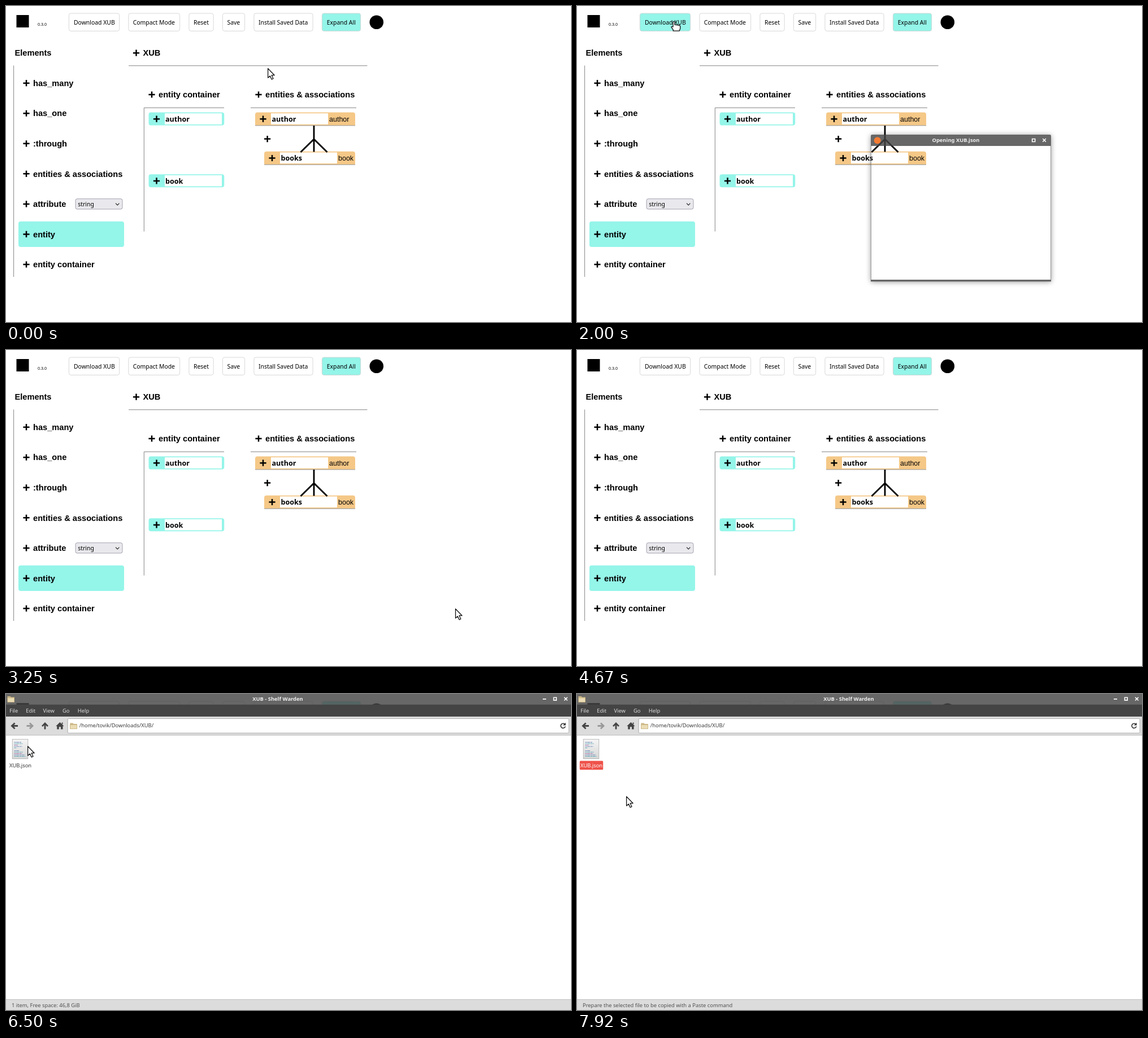
An HTML page for the animation above (8000 ms loop, 1000x560 px).

```html
<!DOCTYPE html>
<html lang="en">
<head>
<meta charset="utf-8">
<title>Entity editor</title>
<style>
html, body { margin: 0; width: 100%; height: 100%; overflow: hidden; background: #fff; }
svg { position: absolute; left: 0; top: 0; width: 1000px; height: 560px; }
text { white-space: pre; }
.head { font: bold 14.625px "Liberation Sans", sans-serif; }
.label { font: 12.5px "Liberation Sans", sans-serif; }
.field { font: bold 12.5px "Noto Sans", sans-serif; }
.ui { font: 10.42px "Noto Sans", sans-serif; }
.tiny { font: 7.1px "Noto Sans", sans-serif; }
.sys { font: 9.375px "Noto Sans", sans-serif; }
.title { font: bold 9.375px "Noto Sans", sans-serif; fill: #f0f0f0; text-anchor: middle; }
.shadow { position: absolute; left: 520px; top: 228px; width: 319px; height: 260px; box-shadow: 0 1px 9px rgba(0,0,0,.4); }
</style>
</head>
<body>
<svg id="page"></svg>
<div id="dialog"><div class="shadow"></div><svg id="dialogArt"></svg></div>
<svg id="files"></svg>
<svg id="pointer"></svg>
<script>
const $ = id => document.getElementById(id);
const AQUA = '#94f5e9', SAND = '#f5c887', RED = '#ee524a', GLASS = 'rgba(70,70,70,.82)';

const text = (x, y, s, cls, more = '') => `<text x="${x}" y="${y}" class="${cls}" ${more}>${s}</text>`;
const rect = (x, y, w, h, fill, more = '') => `<rect x="${x}" y="${y}" width="${w}" height="${h}" fill="${fill}" ${more}/>`;
const line = (d, color = '#000', w = 1, more = '') => `<path d="${d}" fill="none" stroke="${color}" stroke-width="${w}" ${more}/>`;
const shape = (d, fill, more = '') => `<path d="${d}" fill="${fill}" ${more}/>`;
const dot = (x, y, r, fill) => `<circle cx="${x}" cy="${y}" r="${r}" fill="${fill}"/>`;
const plus = (x, y) => line(`M${x - 5.6} ${y}h11.2M${x} ${y - 5.6}v11.2`, '#000', 2.5);
const heading = (x, y, s) => plus(x, y) + text(x + 12, y + 5.2, s, 'head');

// Editor page
const button = ([x, w, s, tx, on], i) =>
  rect(x + .4, 13, w - .8, 31.4, on ? AQUA : '#fff', `id="button${i}" rx="3.5" stroke="#cfcfcf" stroke-width=".8"`) +
  text(tx, 32.8, s, 'ui');

const entity = (y, s) =>
  rect(252.5, y, 133.7, 23, AQUA, 'rx="4"') + rect(281, y + 1.7, 101, 19.6, '#fff') +
  plus(266.5, y + 11.7) + text(282, y + 16.4, s, 'field');

const association = (x, y, s, type) =>
  shape(`M${x} ${y + 23.3}v-19.3q0 -4 4 -4H614q4 0 4 4v19.3z`, SAND) +
  rect(x + 28, y + 1.7, 101, 19.6, '#fff') + line(`M${x} ${y + 23.4}H618`, '#888', .9) +
  plus(x + 14, y + 11.7) + text(x + 29.5, y + 16.4, s, 'field') + text(x + 131, y + 16, type, 'label');

const elements = ['has_many', 'has_one', ':through', 'entities &amp; associations', 'attribute', 'entity', 'entity container'];
const buttons = [
  [111, 90, 'Download XUB', 120], [216.5, 91.5, 'Compact Mode', 224.7], [323.5, 44, 'Reset', 332],
  [383, 40, 'Save', 391.5], [438.5, 105, 'Install Saved Data', 447], [559, 69, 'Expand All', 567.8, true]
];

$('page').innerHTML =
  rect(18.5, 16, 22, 22, '#000') + text(56, 35, '0.3.0', 'tiny') +
  buttons.map(button).join('') + dot(655.8, 28.8, 12.3, '#000') +
  text(15.5, 88.4, 'Elements', 'head') + line('M13.6 105.5V480', '#777', .9) +
  rect(22, 381.7, 187, 45.3, AQUA, 'rx="4"') +
  elements.map((s, i) => heading(36, 136.7 + i * 53.55, s)).join('') +
  rect(123, 341.7, 83, 18.3, '#e9e9ed', 'rx="3" stroke="#8f8f9d" stroke-width=".8"') +
  text(127.3, 355, 'string', 'ui') + line('M194 349.6l3.2 3.2 3.2 -3.2', '#222', 1.2) +
  heading(230.5, 83.2, 'XUB') + line('M217 105.8H639.5', '#777', .9) +
  heading(258, 157, 'entity container') + line('M386 180.4H244.3V399.5', '#777', .9) +
  heading(447, 157, 'entities &amp; associations') + line('M433 180.4H620', '#777', .9) +
  entity(188.5, 'author') + entity(298.2, 'book') +
  association(441, 188.5, 'author', 'author') + association(457, 257.8, 'books', 'book') +
  plus(462.6, 235.6) + line('M545 212V258.5M521.5 259L545 236L568.5 259', '#000', 2.8);

// Save dialog
$('dialogArt').innerHTML =
  shape('M520 248v-18q0 -2 2 -2H837q2 0 2 2v18z', GLASS) +
  line('M520.4 248V488M838.6 248V488', '#777', .8) + rect(520, 485, 319, 3.3, '#666') +
  dot(531.7, 238.2, 6, '#f47b32') + text(670.5, 241.4, 'Opening XUB.json', 'title') +
  line('M805.7 235.5h5v5h-5z', '#fff', 1.6) + line('M824.3 235l5.6 5.6m0 -5.6l-5.6 5.6', '#fff', 1.5);

// File window
const folder = (x, y) =>
  shape(`M${x} ${y + 11}v-10.5h5l1.5 1.5h6v9z`, '#cdb887') +
  rect(x + .4, y + 3.4, 11.8, 7.4, '#eadcb4', 'stroke="#bfa975" stroke-width=".6"');
const arrow = (x, y, turn, color) =>
  line('M6 0H-4M.6 -5L-4.6 0L.6 5', color, 2.8, `transform="translate(${x} ${y}) rotate(${turn})"`);

const inkLines = Array.from({ length: 11 }, (_, i) =>
  line(`M14.5 ${85.5 + i * 2.5}h${[13, 15, 6, 14, 4, 0, 9, 15, 14, 19, 20][i]}`,
    ['#7188b8', '#58a6b5', '#a870a8'][i % 3], 1, 'stroke-dasharray="3 .6 5 .8"')).join('');

const rows = [
  ['Open With "Inkvosel"', 102], ['Open With', 121.7], ['Send To', 143.6], ['Cut', 165.4], ['Copy', 185],
  ['Move to Trash', 207], ['Rename...', 228.8], ['Open Terminal Here', 250.7], ['Create Archive...', 270.4], ['Properties...', 292.2]
];
const rowIcons =
  rect(42.5, 97, 9.5, 10.5, '#e8e8e8') + line('M45 105l7.5 -7.5', '#555', 2) +
  line('M44 160l6 9M51 160l-6 9', '#d8d8d8', 1.4) + line('M43.5 170l3 -4M51.5 170l-3 -4', '#e03c3c', 2) +
  rect(42.5, 179.5, 7, 9, '#eee') + rect(45.5, 182, 7, 8.5, '#fff') + line('M47 186h3.5l-2 -2m2 2l-2 2', '#54a845', 1.2) +
  shape('M43.3 204h8.6l-.9 8.5h-6.8z', '#d5d5d5') + line('M42.5 202.6h10.2M46 201h3.2', '#e8e8e8', 1.5) +
  line('M46 205v6M49.2 205v6', '#888', .8) +
  rect(42.4, 245.7, 10.4, 9.8, '#222', 'stroke="#aaa" stroke-width=".8"') + line('M44.4 248l1.7 1.5 -1.7 1.5M47 251.5h2.6', '#fff', .9) +
  rect(43.5, 265, 9, 5, '#f1b93c') + rect(42, 269.5, 10.5, 5.5, '#f7d66d') + line('M43 269h9', '#b86b28', 1) +
  `<circle cx="47.6" cy="292" r="4.9" fill="none" stroke="#ccc" stroke-width="2" stroke-dasharray="2 1.85"/>` +
  `<circle cx="47.6" cy="292" r="3" fill="none" stroke="#ddd" stroke-width="2.6"/>`;

const menu =
  rect(38, 92.5, 141, 209.5, '#444', 'stroke="#353535" stroke-width=".8"') +
  [132.6, 154.4, 196, 217.9, 239.7, 281.3].map(y => line(`M39 ${y}H178.5`, '#3a3a3a', .8)).join('') +
  rect(38.4, 0, 140.4, 19.6, RED, 'id="hover"') + rowIcons +
  rows.map(([s, y]) => text(57.8, y + 3.4, s, 'sys', 'fill="#e6e6e6"')).join('') +
  [121.7, 143.6].map(y => shape(`M169 ${y - 3}l3.6 3 -3.6 3z`, '#e6e6e6')).join('');

$('files').innerHTML =
  '<linearGradient id="paper" x2="0" y2="1"><stop stop-color="#f5f5f5"/><stop offset="1" stop-color="#d6d6d6"/></linearGradient>' +
  rect(0, 0, 1000, 19, GLASS) + folder(2.5, 3.5) + text(481, 11.6, 'XUB - Shelf Warden', 'title') +
  line('M950 9h6', '#fff', 1.7) + line('M969.4 6.3h4.8v4.8h-4.8z', '#fff', 1.6) +
  line('M988 5.9l5.6 5.6m0 -5.6l-5.6 5.6', '#fff', 1.6) +
  rect(0, 18.8, 1000, 21.4, '#444') +
  [['File', 6.3], ['Edit', 35.3], ['View', 65.5], ['Go', 100], ['Help', 126.8]]
    .map(([s, x]) => text(x, 32.6, s, 'sys', 'fill="#ddd"')).join('') +
  rect(0, 40, 1000, 33.3, '#dcdcdc') + rect(0, 73, 1000, 468.5, '#fff') + line('M0 73H1000', '#b4b4b4', .9) +
  arrow(15, 56.5, 0, '#444') + arrow(42.5, 56.5, 180, '#999') + arrow(69, 56.5, 90, '#444') +
  shape('M88.2 57l7.2 -7 7.2 7h-2v5.5h-3.6v-4.2h-3.2v4.2h-3.6V57zM98.7 50.4h1.8v3h-1.8z', '#444') +
  rect(109.2, 43.6, 787 + 100, 25.6, '#fff', 'rx="1.5" stroke="#a5a5a5" stroke-width=".9"') +
  folder(113.3, 51) + text(129.8, 59.4, '/home/tovik/Downloads/XUB/', 'sys', 'fill="#3c3c3c"') +
  line('M989.4 54A4.1 4.1 0 1 0 990 57.4', '#333', 1.6) + shape('M990.6 50.8v4.8h-4.8z', '#333') +
  rect(11.2, 80.2, 27.6, 34.6, 'url(#paper)', 'stroke="#aaa" stroke-width=".8"') + inkLines +
  rect(4.8, 118.4, 41.4, 15.8, RED, 'id="selection" rx="1.5"') +
  text(25.5, 129.6, 'XUB.json', 'sys', 'id="fileName" text-anchor="middle"') +
  rect(0, 541.4, 1000, 18.6, '#dcdcdc') + line('M0 541.4H1000', '#b8b8b8', .9) +
  text(10, 555.2, '', 'sys', 'id="status" fill="#505050"') + `<g id="menu">${menu}</g>`;

// Pointer
$('pointer').innerHTML =
  '<g id="cursor" stroke="#111" stroke-width="1.3" stroke-linejoin="round" fill="#fff">' +
  '<path id="arrow" d="M.6 .8V17.2L4.3 13.9L7.2 20L10 18.7L7.2 12.7H12.2Z"/>' +
  '<path id="hand" d="M-3 1.2q1.6 -1.6 3 .3V6.2l7.4 .8q2.3 .3 2.3 2.5v3.6l-1.5 4H-2.8v-2.2L-6 10.6q.2 -2.2 3 -.6z"/></g>';

// Pointer path: [tick, x, y], twelve ticks per second
const path = [
  [0, 463, 110], [6, 463, 110], [16, 173, 27], [31, 173, 27], [34, 795, 458], [39, 795, 458],
  [42, 540, 303], [43, 540, 303], [44, 530, 296], [45, 530, 296], [50, 439, 11], [69, 439, 11],
  [70, 300, 32], [73, 44, 98], [77, 44, 98], [78, 38, 92], [82, 38, 92], [86, 77, 184],
  [87, 84, 184], [92, 84, 184], [93, 87, 181], [96, 87, 181]
];

function pointerAt(tick) {
  const i = path.findIndex(p => p[0] > tick);
  const [t0, x0, y0] = path[i - 1], [t1, x1, y1] = path[i];
  const u = (tick - t0) / (t1 - t0), k = u * u * (3 - 2 * u);
  return [x0 + (x1 - x0) * k, y0 + (y1 - y0) * k];
}

const show = (id, on) => { $(id).style.display = on ? '' : 'none'; };

function draw(ms) {
  const tick = Math.floor(ms * .012 + .05) % 96;
  const [x, y] = pointerAt(tick);
  const manager = tick >= 68, selected = tick >= 81, menuOpen = selected && tick < 95;
  const onButton = !manager && x > 111 && x < 201 && y > 13 && y < 44;

  $('button0').setAttribute('fill', onButton ? AQUA : '#fff');
  show('dialog', tick >= 23 && tick < 39);
  $('dialog').style.opacity = tick === 23 ? .5 : 1;
  show('files', manager);
  show('selection', selected);
  show('menu', menuOpen);
  $('fileName').setAttribute('fill', selected ? '#fff' : '#333');
  $('status').textContent = tick >= 86
    ? 'Prepare the selected file to be copied with a Paste command'
    : '1 item, Free space: 46,8 GiB';

  const row = rows.find(r => Math.abs(r[1] - y) < 9.9);
  show('hover', row && tick > 82);
  if (row) $('hover').setAttribute('y', row[1] - 9.8);

  show('cursor', tick < 56 || tick >= 70);
  show('hand', onButton);
  show('arrow', !onButton);
  $('cursor').setAttribute('transform', `translate(${x} ${y})`);
}

const start = performance.now();
function frame() {
  draw((performance.now() - start) % 8000);
  requestAnimationFrame(frame);
}
frame();
</script>
</body>
</html>
```
